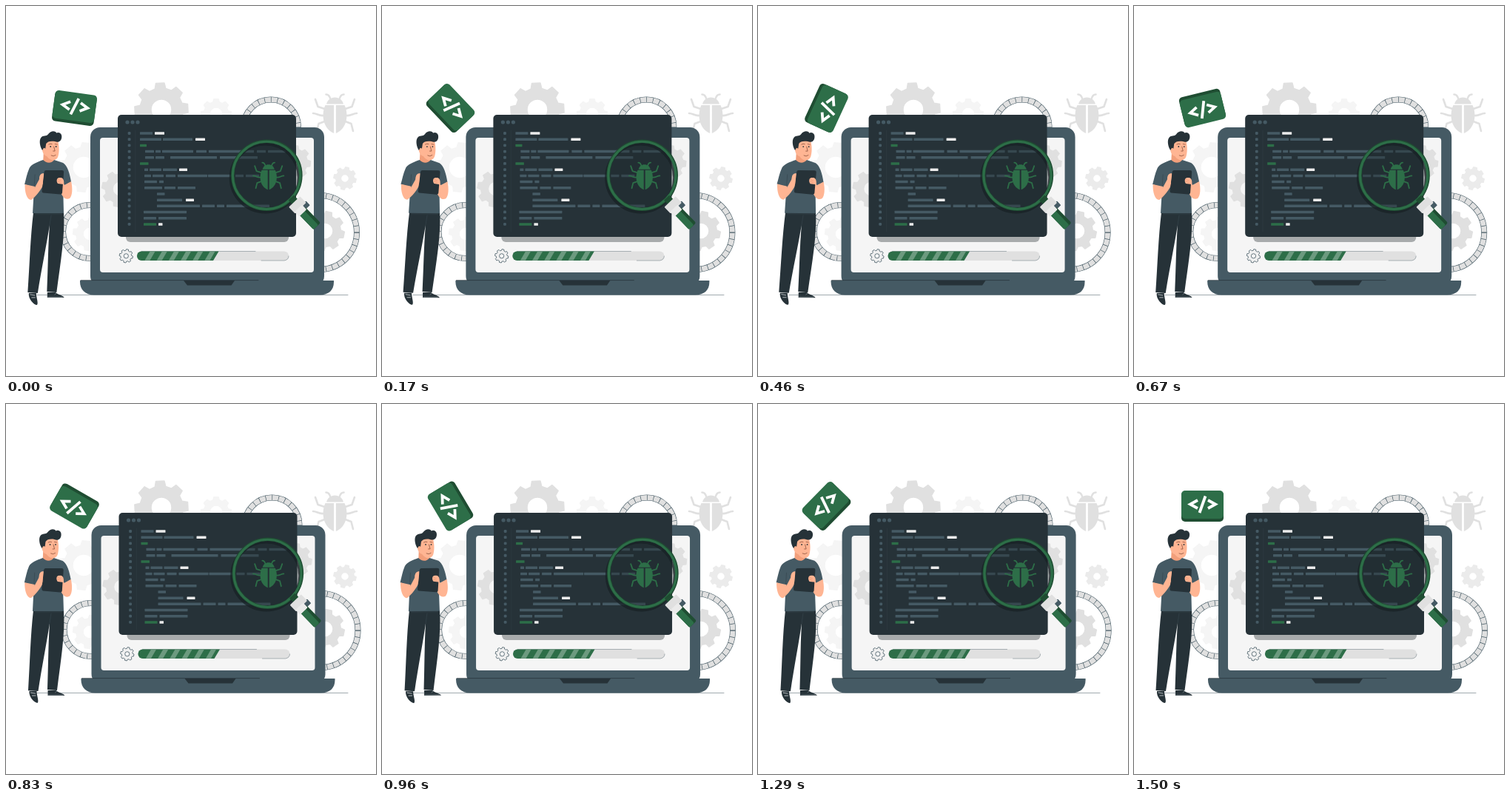
Animation of 500x500 px, one loop 1.54 s. Source, as an HTML page:

```html
<!DOCTYPE html>
<html lang="en">
<head>
<meta charset="utf-8">
<title>Debugging</title>
<style>
  html, body { margin: 0; width: 100%; height: 100%; overflow: hidden; background: #fff; }
  svg { display: block; width: 100vw; height: 100vh; }
</style>
</head>
<body>
<svg id="stage" viewBox="0 0 500 500"></svg>
<script>
const DARK = '#263238', SLATE = '#455a64', GREEN = '#2d6e48', DEEP = '#1f4d32';
const GRAY = '#e0e0e0', PALE = '#f5f5f5', SKIN = '#ffb593';

const rect = (x, y, w, h, r, fill) =>
  `<rect x="${x}" y="${y}" width="${w}" height="${h}" rx="${r}" fill="${fill}"/>`;
const circle = (x, y, r, fill, extra = '') =>
  `<circle cx="${x}" cy="${y}" r="${r}" fill="${fill}" ${extra}/>`;
const shape = (d, fill, extra = '') => `<path d="${d}" fill="${fill}" ${extra}/>`;
const line = (d, color, width) =>
  `<path d="${d}" fill="none" stroke="${color}" stroke-width="${width}" stroke-linecap="round" stroke-linejoin="round"/>`;

// Toothed wheel with a round hole
function gear(x, y, r, hole, fill, turn = 0, teeth = 8, edge = fill, width = 1.5) {
  const pts = [], step = 2 * Math.PI / teeth;
  for (let i = 0; i < teeth; i++) {
    [[-.32, .79], [-.2, .98], [.2, .98], [.32, .79]].forEach(([a, k]) => {
      const q = (i + a) * step + turn;
      pts.push((x + r * k * Math.sin(q)).toFixed(1) + ' ' + (y - r * k * Math.cos(q)).toFixed(1));
    });
  }
  const ring = `M${x - hole} ${y}a${hole} ${hole} 0 1 0 ${2 * hole} 0a${hole} ${hole} 0 1 0 ${-2 * hole} 0Z`;
  return shape(`M${pts.join('L')}Z${ring}`, fill,
    `fill-rule="evenodd" stroke="${edge}" stroke-width="${width}" stroke-linejoin="round"`);
}

function bug(x, y, scale, color) {
  const half = shape('M-1.4 -13H-13C-18 -3 -18 18 -1.4 25Z', color) +
    line('M-6 -21C-7 -25 -9 -27.5 -12 -27.5M-14 -8L-23 -11L-26.5 -21M-15 1C-22 2 -24 -2 -29.5 -2M-14 9L-22 12L-24.5 22', color, 2.6);
  return `<g transform="translate(${x} ${y}) scale(${scale})">${half}<g transform="scale(-1 1)">${half}</g>` +
    shape('M-11.5 -14.5C-10 -20 -6 -23.5 0 -23.5S10 -20 11.5 -14.5Z', color) + '</g>';
}

const cable = (x, y, r) =>
  circle(x, y, r, 'none', `stroke="${SLATE}" stroke-width="8"`) +
  circle(x, y, r, 'none', `stroke="${GRAY}" stroke-width="6.8"`) +
  circle(x, y, r, 'none', `stroke="${SLATE}" stroke-width="7" stroke-dasharray=".7 8"`);

function laptop() {
  return rect(114, 164, 316, 214, 13, SLATE) + rect(127, 178, 289, 182, 4, PALE) +
    gear(154, 247, 25, 10, GRAY, .2) + gear(389, 211, 23, 9, GRAY, .1) +
    shape('M100 371H443V373C443 384 436 390.5 424 390.5H119C107 390.5 100 383 100 373Z', SLATE) +
    line('M101 370.6H341', DARK, .7) + shape('M240 371H309L304.500 377.500H245Z', DARK);
}

// Each row: pairs of left and right edge
const rows = [
  [181, 198, 201, 214], [181, 210, 212, 252, 256, 269], [181, 190],
  [188, 200, 202, 209, 211, 253, 257, 271, 274, 335, 339, 351, 354, 378],
  [188, 200, 202, 214, 222, 285, 289, 340], [181, 192.5],
  [187, 192, 194, 210, 212, 231, 234, 245],
  [187, 196, 198, 213, 216, 229, 232, 272, 273, 307, 310, 321, 324, 342],
  [187, 204, 207, 213], [187, 211, 214, 229, 232, 256], [204, 214.5],
  [204, 238, 243, 254], [204, 262, 265, 282, 285, 295, 298, 356],
  [186, 244], [186, 203, 206, 244], [186, 203, 206, 211.5]
];
const whiteEnd = [0, 1, 6, 11, 15], greenStart = [2, 5, 15];

function editor() {
  let s = rect(162, 296, 220, 23, 6, '#a8abac') + rect(151, 147, 241, 165, 5, DARK);
  [164, 171, 178].forEach(x => s += circle(x, 157, 2.6, SLATE));
  s += line('M174.800 168V305', '#303d44', .7);
  rows.forEach((row, i) => {
    const y = 170.3 + i * 8.19;
    s += rect(164.7, y - .2, 3.8, 3.8, 1.2, SLATE);
    for (let k = 0; k < row.length; k += 2) {
      const last = k + 2 === row.length;
      const fill = last && whiteEnd.includes(i) ? '#ececec' : !k && greenStart.includes(i) ? GREEN : SLATE;
      s += rect(row[k], y, row[k + 1] - row[k], 3.5, .5, fill);
    }
  });
  return s;
}

function progress() {
  let s = gear(162.3, 337.8, 9.4, 3.1, '#f0f0f0', .2, 8, SLATE, .8) +
    rect(177, 331.5, 205, 12.5, 6.2, GRAY) +
    line('M183 331.500H337M345 344H376Q382 343 382 338', '#607078', .5) +
    shape('M183.200 331.500H287.500L280 344H183.200A6.200 6.200 0 0 1 183.200 331.500Z', GREEN);
  for (let i = 0; i < 6; i++)
    s += shape(`M${194.5 + i * 16.2} 331.8h7l-7 12h-7Z`, '#6c9a7f');
  return s;
}

function lens() {
  return circle(350.5, 232, 46, '#1b2529', 'fill-opacity=".35"') +
    circle(350.3, 232, 46, 'none', 'stroke="#172024" stroke-width="5" opacity=".75"') +
    circle(352.3, 228.700, 46, 'none', `stroke="${DEEP}" stroke-width="4.6"`) +
    circle(352, 228.9, 45.6, 'none', `stroke="${GREEN}" stroke-width="3"`) +
    '<g transform="translate(388 262) rotate(46)">' +
    rect(-4, -5, 9, 10, 0, DEEP) + rect(13, -11.5, 8, 10, 1, SLATE) +
    rect(18, -5, 30, 13, 2, DEEP) + rect(18, -1, 30, 9, 2, GREEN) +
    rect(3, -10, 12, 21, 1, GRAY) + rect(13, -4, 9, 14, 1, '#ebebeb') + '</g>';
}

function man() {
  const shoes = shape('M31 388L41 388C41 394 44.500 402 42 404C38 404 30 396 31 388Z', DARK) +
    line('M33 390L39 391M35 394L39.500 394', '#d5dadc', .8) +
    shape('M56 387H67C70 390 77 391 79 394H56Z', DARK) + line('M66 390L68 388.500M57 393H76', '#7f8c92', .6);
  const legs = shape('M37 279H78C80 310 74 345 68.500 387L55.500 386C57 350 57 322 59 296C55 322 48 356 43 388L29.500 387C32 350 33 312 37 279Z', DARK) +
    line('M59 296L61 283M40 281H75', '#37474f', .6);
  const head = shape('M51 191L50 211C54 216 62 215 65 210L64 205Z', '#f29f7b') +
    shape('M51 184C56 179 66 180 70 182C72 190 72 198 70 204C67 210 60 210 55 203C51 202 48 196 49 192Z', SKIN) +
    shape('M49 195C46 191 44 182 47 178C50 174 54 177 57 173C60 168.500 66 168 68 171.500C72 169.500 76 173 75 178C74 184 69 184.500 66 183C60 182 56 183 54 186L53 193Q51 190 49 195Z', DARK) +
    circle(60, 190, .9, DARK) + circle(67.5, 190, .9, DARK) +
    line('M57.500 187Q60 185.500 62 186.500M66 186.500L69 187M61 202Q64 204 67 201.500M64.500 190L66 196L63.500 196', '#7b4330', .7);
  const torso = shape('M50 208C42 211 34 214 31.500 219C28 227 27 234 25 241L38 245L36 280H78L77 243L88 238C86 226 83 216 77 212L65 208C60 214 54 212 50 208Z', SLATE) +
    line('M39 228L38 245M77 228V243', '#37474f', .7);
  const arms = shape('M25.500 241L39 244L38.500 246L45 234C45 230 48 226 51 226L52 238C48 248 40 258 34 262C28 262 25 251 25.500 241Z', SKIN) +
    shape('M88 237C90 246 90 256 86 260C80 263 75 257 73 249L69 240C67 235 71 231 75 232C78 235 77 239 79 242Z', SKIN);
  const tablet = shape('M54 222H75.500Q78 222 78 224L76 252Q76 254.500 73 254.500L50 252.500Q48 252 48.500 249L51.500 224Q52 222 54 222Z', DARK);
  const hands = shape('M45 233C45 228 48 225.500 50.500 227L49.500 241L44 243Z', SKIN) +
    shape('M70 240C67 236 69 231 73 232C77 231 79 236 78 241Z', SKIN) +
    line('M70 234.500L74 236M70 237L74 238.500', '#e58f6c', .6);
  return shoes + legs + head + torso + arms + tablet + hands;
}

const sign = () => rect(-28.5, -20, 57, 41, 5, DEEP) + rect(-28.5, -21, 57, 38, 5, GREEN) +
  '<g fill="none" stroke="#fff" stroke-width="3.800"><path d="M-6.500 -8L-16.500 -2.500L-6.500 3M7.500 -8L17.500 -2.500L7.500 3"/><path d="M4 -13.500L-4 9"/></g>';

const stage = document.getElementById('stage');
stage.innerHTML =
  gear(210, 140, 37, 14, GRAY, -.05) + gear(284, 146, 21, 9, PALE, 0) +
  gear(105, 218, 34, 15, PALE, .1) + gear(113, 308, 23, 9, PALE, .15) +
  gear(458, 233, 15.5, 5.500, '#ebebeb', .2) + gear(431, 304, 27, 11, GRAY, .2) +
  bug(444.5, 147, 1, GRAY) + line('M42 390.500H462', '#607078', .6) +
  `<g id="device">${cable(358, 163.5, 37)}${cable(113, 305, 36)}${cable(424, 306, 50)}
    ${laptop()}${progress()}${editor()}${lens()}</g>` +
  bug(354.7, 230.800, .7, GREEN) +
  `<g id="man">${man()}</g><g id="sign">${sign()}</g>`;

// Steps: time in ms, value
const shake = [[0, 0], [114, -1.6], [268, 1.3], [290, 1.1], [430, -1.6], [460, -1.4], [576, 1.6],
  [670, -.9], [730, -1.6], [830, 1.5], [884, 1.6], [1038, -1.6], [1080, -.9], [1192, 1.3], [1346, -1.3], [1500, 0], [1540, 0]];
const spin = [[0, 7.8], [290, 75], [460, 115], [670, 167], [830, 209], [1080, 268], [1500, 360], [1540, 368]];
const sway = [[0, .1], [345, 1], [1115, -1], [1500, 0], [1540, .1]];

function at(steps, t) {
  const i = Math.max(1, steps.findIndex(s => s[0] >= t));
  const [t0, a] = steps[i - 1], [t1, b] = steps[i];
  return a + (b - a) * (t - t0) / (t1 - t0);
}

const LOOP = 1540, TICK = 1000 / 24;
const [device, person, badge] = ['device', 'man', 'sign'].map(id => document.getElementById(id));

function draw() {
  const now = performance.now() % LOOP;
  const t = Math.min(36, Math.floor((now + 5) / TICK)) * TICK;
  device.setAttribute('transform', `translate(${at(shake, t)} 0)`);
  person.setAttribute('transform', `rotate(${at(sway, t)} 57 287)`);
  badge.setAttribute('transform', `translate(92.5 138) rotate(${at(spin, t)})`);
  requestAnimationFrame(draw);
}
draw();
</script>
</body>
</html>
```
